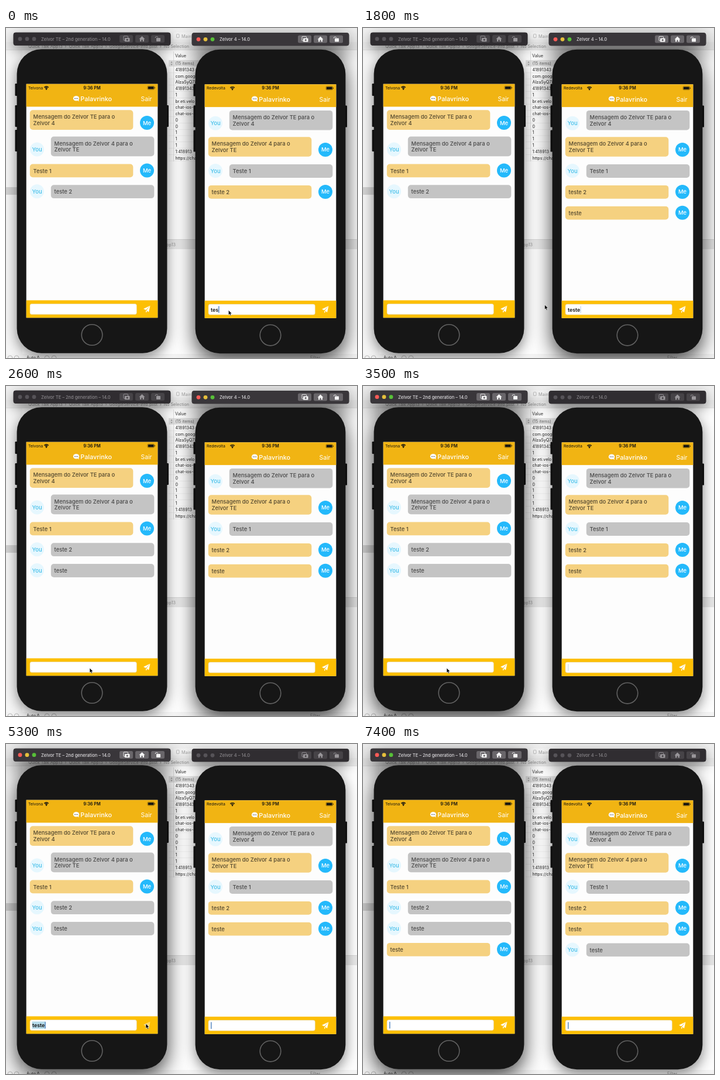
Write an HTML page with a canvas that moves like this. It is 600 px wide and 564 px high and loops after 7.5 s.

```html
<!DOCTYPE html>
<html lang="pt">
<head>
<meta charset="utf-8">
<title>Palavrinko</title>
<style>
html, body { margin: 0; width: 100%; height: 100%; overflow: hidden; background: #f6f6f6; }
canvas { display: block; width: 600px; height: 564px; }
</style>
</head>
<body>
<canvas id="stage"></canvas>
<script>
const W = 600, H = 564, LOOP = 7500, STEP = 100;
const FONT = 'Inter, "Open Sans", sans-serif';
const canvas = document.getElementById('stage');
const g = canvas.getContext('2d');
const dpr = window.devicePixelRatio || 1;
canvas.width = W * dpr;
canvas.height = H * dpr;

// Moments of the story, in ms
const SENT_R = 1400, CLEAR_R = 2000, GOT_L = 2100, SWITCH = 2700, FOCUS_L = 3600;
const SENT_L = 5400, CLEAR_L = 5600, GOT_R = 5700, HIDE = 7000;
const WORD = 'teste';
const POINTER = [
  [0, 380.3, 482.3], [500, 380.3, 482.3], [900, 545, 478], [1300, 545, 478],
  [1800, 310.5, 473], [2300, 143, 482], [4500, 143, 482], [5000, 239, 478],
  [5400, 239, 478], [6100, 535, 118], [6500, 535, 118], [HIDE, 545, 16]
];
const TALK = [
  ['Mensagem do Zelvor TE para o', 'Zelvor 4'],
  ['Mensagem do Zelvor 4 para o', 'Zelvor TE'],
  ['Teste 1'], ['teste 2'], [WORD], [WORD]
];
const ROW_Y = [140.3, 185.6, 232.5, 268.3, 304.1, 339.9];
const LEFT_SENDS = [0, 2, 5];
const VALUES = ['(15 items)', '41891343', 'com.googl', 'AIzaSyQ7k', '41891343', '1',
  'br.eti.velo', 'chat-ios-8', 'chat-ios-8', '0', '0', '1', '1', '1', '1:418913', 'https://cha'];

function rect(x, y, w, h, fill) {
  g.fillStyle = fill;
  g.fillRect(x, y, w, h);
}

function round(x, y, w, h, r, fill, stroke) {
  g.beginPath();
  g.roundRect(x, y, w, h, r);
  if (fill) { g.fillStyle = fill; g.fill(); }
  if (stroke) { g.strokeStyle = stroke; g.stroke(); }
}

function disc(x, y, r, fill) {
  g.beginPath();
  g.arc(x, y, r, 0, Math.PI * 2);
  g.fillStyle = fill;
  g.fill();
}

function poly(points, fill) {
  g.beginPath();
  points.forEach(([x, y]) => g.lineTo(x, y));
  g.closePath();
  g.fillStyle = fill;
  g.fill();
}

function text(str, x, y, size, fill, weight = 400, align = 'left') {
  g.font = `${weight} ${size}px ${FONT}`;
  g.textAlign = align;
  g.textBaseline = 'alphabetic';
  g.fillStyle = fill;
  g.fillText(str, x, y);
}

function drawEditor() {
  rect(0, 0, W, H, '#fdfdfd');
  rect(0, 0, 28, H, '#f6f6f6');
  rect(0, 0, W, 24, '#f1f1f1');
  rect(0, 24, W, 13, '#ececec');
  rect(0, 37, W, 0.6, '#d2d2d2');
  round(286, 7.5, 240, 12, 2, '#f7f7f7');
  round(291.5, 10.5, 4.5, 6, 0.8, null, '#b4b4b4');
  text('Main', 300, 17, 7.3, '#a4a4a4');
  text('Quick Talk App13  ›  Quick Talk App13  ›  GoogleService-Info.plist  ›  No Selection',
    313, 34, 7.2, '#8a8a8a', 400, 'right');
  text('Value', 289, 50, 7.3, '#333333');
  VALUES.forEach((v, i) => {
    const y = 54.9 + i * 10.77;
    if (!i) rect(278, y, 280, 10.77, '#e0e0e0');
    rect(278, y + 10.4, 280, 0.4, '#dddddd');
    text(v, 289.5, y + 8.1, 7.1, i ? '#222222' : '#666666');
  });
  rect(286, 40, 0.6, 188, '#cccccc');
  poly([[281.2, 59.5], [283, 57], [284.8, 59.5]], '#999999');
  poly([[281.2, 61.5], [283, 64], [284.8, 61.5]], '#999999');
  rect(0, 272, 28, 13, '#d3d3d3');
  rect(28, 361, W - 28, 17, '#e8e8e8');
  rect(28, 361, W - 28, 0.6, '#cccccc');
  text('Quick Talk App13', 290, 372.7, 7.2, '#999999', 400, 'right');
  rect(0, 557, W, 7, '#f3f3f3');
  g.lineWidth = 0.8;
  for (const x of [7, 18, 70, 82]) {
    g.beginPath();
    g.arc(x, 564, 4, Math.PI, 0);
    g.strokeStyle = '#aaaaaa';
    g.stroke();
  }
  text('Auto ◊', 35, 566, 7.3, '#333333');
  text('Filter', 520, 566, 7.3, '#999999');
}

// One silhouette, so bar and body cast a single shadow
function drawShell(active) {
  for (const [x, y, h] of [[15.5, 95, 21], [15.5, 132, 37], [15.5, 174, 37], [273, 132, 37]])
    round(x, y, 5, h, 1.2, '#151515');
  g.save();
  g.shadowColor = `rgba(0,0,0,${active ? 0.75 : 0.48})`;
  g.shadowBlur = (active ? 34 : 22) * dpr;
  g.shadowOffsetY = (active ? 12 : 7) * dpr;
  g.beginPath();
  g.roundRect(12.7, 7.7, 268.6, 22, 4);
  g.roundRect(18.6, 36.2, 256.8, 519.5, 42);
  g.fillStyle = '#161616';
  g.fill();
  g.restore();
  g.beginPath();
  g.arc(147, 524.5, 17.8, 0, Math.PI * 2);
  g.lineWidth = 1.6;
  g.strokeStyle = '#616161';
  g.stroke();
}

function drawBarIcons(ink, face) {
  for (let i = 0; i < 3; i++) round(194 + i * 27, 12, 23, 13, 2.5, face);
  // camera in front of a sheet
  g.lineWidth = 0.9;
  round(201, 13.8, 7.5, 7.5, 1, null, ink);
  round(203, 17, 8.5, 6.2, 1, ink);
  disc(207.2, 20.1, 1.6, face);
  // house
  poly([[227.5, 19], [232.5, 14], [237.5, 19], [236, 19], [236, 23], [233.6, 23],
    [233.6, 20], [231.4, 20], [231.4, 23], [229, 23], [229, 19]], ink);
  // rotation
  round(257, 17, 7, 6, 0.8, ink);
  g.beginPath();
  g.arc(257.5, 17, 2.4, Math.PI, Math.PI * 1.9);
  g.strokeStyle = ink;
  g.stroke();
}

function drawBar(phone, active) {
  round(12.7, 7.7, 268.6, 22, 4, active ? '#39363a' : '#302d31');
  const lights = active ? ['#fc5b57', '#e5bf3c', '#57c038'] : ['#565358', '#565358', '#565358'];
  lights.forEach((c, i) => disc(24 + i * 12, 18.7, 3.4, c));
  text(phone.title, 60, 21.6, 7.5, active ? '#dedcdf' : '#89868a', 500);
  drawBarIcons(active ? '#f4f4f4' : '#99969a', active ? '#69666a' : '#464347');
}

function drawHeader(phone) {
  rect(34.7, 95.7, 224.6, 38.8, '#f1b413');
  text(phone.net, 38, 104.8, 6.8, '#111111');
  // wifi
  const wx = phone.wifi;
  g.strokeStyle = '#111111';
  g.lineWidth = 1.3;
  for (const r of [2.8, 5]) {
    g.beginPath();
    g.arc(wx, 105, r, -Math.PI * 0.77, -Math.PI * 0.23);
    g.stroke();
  }
  disc(wx, 104.5, 1.2, '#111111');
  text('9:36 PM', 147, 104.8, 7.3, '#111111', 600, 'center');
  g.lineWidth = 0.6;
  round(242, 99.3, 11.5, 5.8, 1.6, null, '#4c3b0d');
  round(242.9, 100.2, 9.7, 4, 0.9, '#111111');
  rect(254.1, 101.2, 0.9, 2, '#4c3b0d');
  // speech balloon
  g.beginPath();
  g.ellipse(120, 120.3, 5.2, 4.3, 0, 0, Math.PI * 2);
  g.fillStyle = '#fbfbfb';
  g.fill();
  poly([[121.5, 123.5], [124.8, 125.6], [124, 121.5]], '#fbfbfb');
  for (let i = -1; i < 2; i++) disc(120 + i * 2.4, 120.4, 0.75, '#555555');
  text('Palavrinko', 127.3, 124.9, 10.8, '#ffffff', 500);
  text('Sair', 249.5, 124.9, 10.4, '#ffffff', 400, 'right');
}

function drawRow(i, mine) {
  const lines = TALK[i], y = ROW_Y[i];
  const h = lines.length > 1 ? 33.6 : 22.8;
  const x = mine ? 40.8 : 76.8, ax = mine ? 241 : 53;
  const ay = y + h - 11.8;
  round(x, y, 176.5, h, 5, mine ? '#f5d180' : '#c4c4c4');
  lines.forEach((s, n) => text(s, x + 5.8, y + 15.1 + n * 10.7, 9.4, mine ? '#51462d' : '#474747', 500));
  disc(ax, ay, 12, mine ? '#24b9fb' : '#e6f7fe');
  text(mine ? 'Me' : 'You', ax, ay + 3.4, 9.5, mine ? '#ffffff' : '#45bfe9', 500, 'center');
}

function caretAlpha(t) {
  const p = t % 1000;
  if (p < 420) return 1;
  if (p < 550) return 0.25;
  return p < 780 ? 0 : p < 900 ? 0.3 : 0.8;
}

function drawInput(state, t) {
  rect(34.7, 465.4, 224.6, 29.8, '#fdbf04');
  g.lineWidth = 0.6;
  round(41, 471.5, 182.3, 18, 3, '#ffffff', '#e2d7b0');
  g.font = `600 8.8px ${FONT}`;
  const end = 45 + g.measureText(state.typed).width;
  if (state.marked) rect(44.5, 474.3, end - 44, 12.5, '#b5dbea');
  text(state.typed, 45, 483.9, 8.8, '#111111', 600);
  if (state.focus) {
    g.globalAlpha = caretAlpha(t);
    rect(end + 0.2, 474.7, 1.2, 11.6, '#2f6cb5');
  }
  // paper plane
  g.globalAlpha = state.press ? 0.5 : 1;
  poly([[246.5, 474.5], [235, 480], [239, 482]], '#ffffff');
  poly([[246.5, 474.5], [240, 482.4], [244, 485.5]], '#ffffff');
  poly([[239, 482.8], [239.2, 486.5], [241.2, 484.3]], '#ffffff');
  g.globalAlpha = 1;
}

const phones = [
  { x: 0, y: 0, title: 'Zelvor TE – 2nd generation – 14.0', net: 'Telvona', wifi: 69 },
  { x: 305, y: 0.6, title: 'Zelvor 4 – 14.0', net: 'Redevolta', wifi: 82 }
];

function stateOf(side, t) {
  if (side === 0) {
    const n = t < 3800 ? 0 : Math.min(5, 1 + Math.floor((t - 3800) / 150));
    return {
      count: t < GOT_L ? 4 : t < SENT_L ? 5 : 6,
      typed: t < CLEAR_L ? WORD.slice(0, n) : '',
      marked: n > 4 && t < CLEAR_L,
      focus: t >= FOCUS_L,
      press: t >= 5200 && t < SENT_L
    };
  }
  return {
    count: t < SENT_R ? 4 : t < GOT_R ? 5 : 6,
    typed: t < CLEAR_R ? WORD.slice(0, Math.min(5, 3 + Math.floor(t / 200))) : '',
    marked: false,
    focus: true,
    press: t >= 1100 && t < SENT_R
  };
}

function drawPhone(side, active, t) {
  const phone = phones[side], state = stateOf(side, t);
  g.save();
  g.translate(phone.x, phone.y);
  drawShell(active);
  drawBar(phone, active);
  rect(34.7, 95.7, 224.6, 399.5, '#fdfdfd');
  drawHeader(phone);
  for (let i = 0; i < state.count; i++) drawRow(i, LEFT_SENDS.includes(i) === (side === 0));
  drawInput(state, t);
  g.restore();
}

function drawPointer(t) {
  if (t >= HIDE) return;
  const n = POINTER.findIndex(p => p[0] > t);
  const [t0, x0, y0] = POINTER[n - 1], [t1, x1, y1] = POINTER[n];
  const u = (t - t0) / (t1 - t0), e = u * u * (3 - 2 * u);
  g.save();
  g.translate(x0 + (x1 - x0) * e, y0 + (y1 - y0) * e);
  poly([[0, 0], [0, 8.2], [1.9, 6.5], [3.2, 9.4], [4.7, 8.7], [3.4, 5.9], [5.9, 5.8]], '#000000');
  g.lineWidth = 0.6;
  g.strokeStyle = '#ffffff';
  g.stroke();
  g.restore();
}

function frame(now) {
  const t = Math.floor((now % LOOP) / STEP) * STEP;
  const front = t < SWITCH ? 1 : 0;
  g.setTransform(dpr, 0, 0, dpr, 0, 0);
  drawEditor();
  drawPhone(1 - front, false, t);
  drawPhone(front, true, t);
  drawPointer(t);
}

let start = null;
function tick(now) {
  if (start === null) start = now;
  frame(Math.max(0, now - start));
  requestAnimationFrame(tick);
}
frame(0);
requestAnimationFrame(tick);
</script>
</body>
</html>
```
